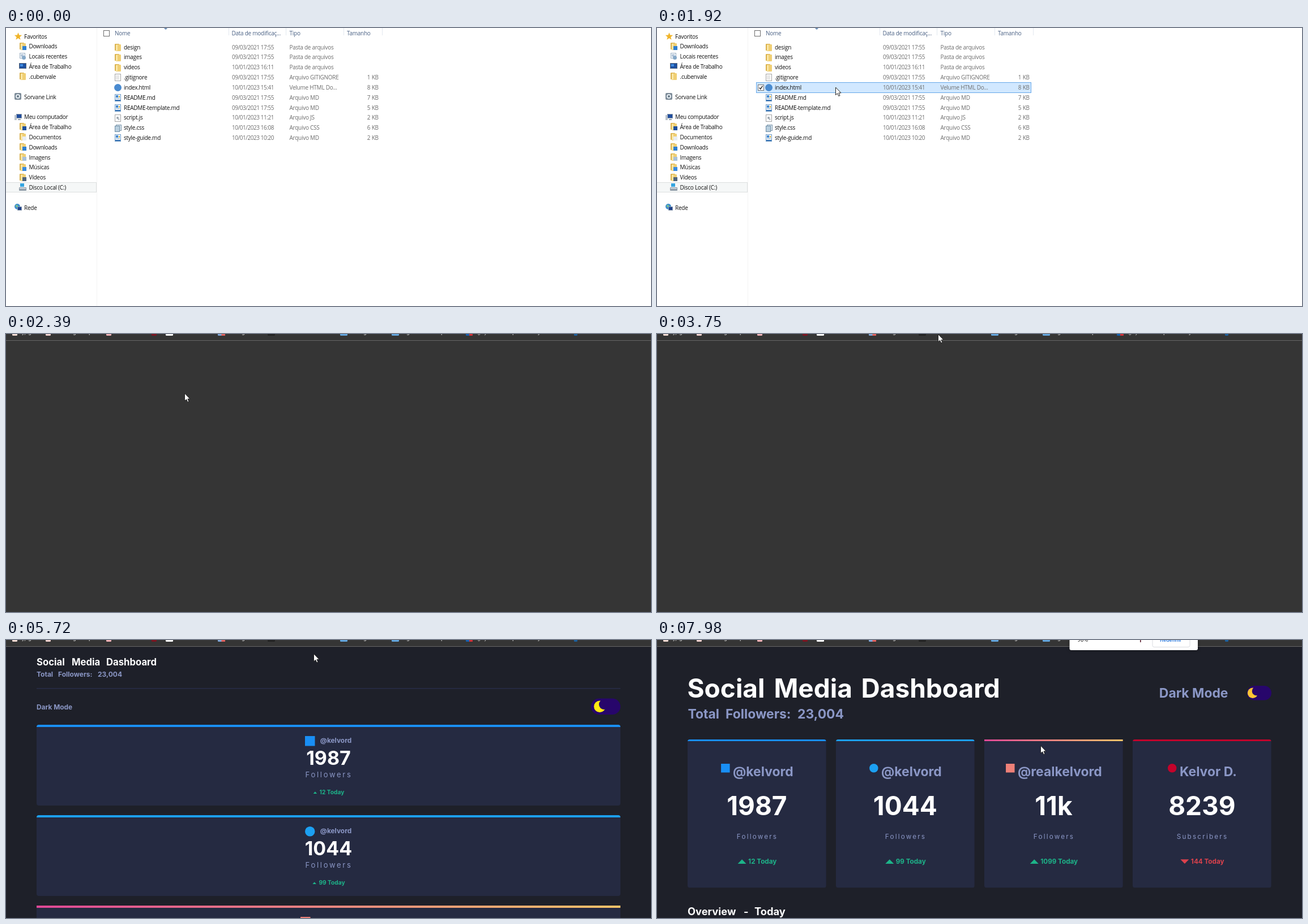
Recreate the animation shown at these times as an HTML page with a canvas. Size 1139x492 px, loop 8000 ms.

```html
<!DOCTYPE html>
<html lang="pt">
<head>
<meta charset="utf-8">
<title>Social Media Dashboard</title>
<style>
html, body { margin: 0; width: 100%; height: 100%; overflow: hidden; background: #fff; }
canvas { display: block; }
</style>
</head>
<body>
<canvas id="stage" width="1139" height="492"></canvas>
<script>
const W = 1139, H = 492, LOOP = 8000;
let c = document.getElementById('stage').getContext('2d');

const UI = '"Open Sans", "Noto Sans", sans-serif';
const ROBOTO = 'Roboto, sans-serif';
const INTER = 'Inter, sans-serif';
const SERIF = '"Liberation Serif", serif';

// ---------- helpers ----------
function rect(x, y, w, h, color) {
  c.fillStyle = color;
  c.fillRect(x, y, w, h);
}

function round(x, y, w, h, r, color) {
  c.fillStyle = color;
  c.beginPath();
  c.roundRect(x, y, w, h, r);
  c.fill();
}

function disc(x, y, r, color) {
  c.fillStyle = color;
  c.beginPath();
  c.arc(x, y, r, 0, 7);
  c.fill();
}

function frame(x, y, w, h, fill, line) {
  rect(x, y, w, h, fill);
  c.strokeStyle = line;
  c.lineWidth = 1;
  c.strokeRect(x + .5, y + .5, w - 1, h - 1);
}

function poly(points, color) {
  c.fillStyle = color;
  c.beginPath();
  points.forEach(([x, y]) => c.lineTo(x, y));
  c.fill();
}

// Returns the left edge of the drawn text.
function text(s, x, y, font, color, align = 'left', spacing = 0) {
  c.font = font;
  c.fillStyle = color;
  c.textAlign = 'left';
  c.letterSpacing = spacing + 'px';
  const w = c.measureText(s).width - spacing;
  const left = align === 'center' ? x - w / 2 : align === 'right' ? x - w : x;
  c.fillText(s, left, y);
  c.letterSpacing = '0px';
  return left;
}

function words(s, xs, y, font, color) {
  s.split(' ').forEach((word, i) => text(word, xs[i], y, font, color));
}

function seeded(seed) {
  return () => (seed = (seed * 16807) % 2147483647) / 2147483647;
}

// ---------- pointer ----------
// [first step, last step, number of steps, x, y]
const MOVES = [
  [70, 70, 1, 1054, 474], [139, 830, 11, 344, 118], [900, 900, 1, 332, 114.5],
  [970, 970, 1, 319, 107], [1170, 1170, 1, 315, 104.5],
  [2720, 2930, 4, 394, 109], [3260, 3260, 1, 395, 110],
  [3610, 3750, 3, 496, 0], [3820, 3820, 1, -50, -50],
  [5720, 5720, 1, 543, 24], [5790, 5870, 2, 612, 121],
  [6170, 6450, 5, 589, 126], [6520, 6650, 3, 594, 125.5],
  [7690, 7760, 2, 624, 103], [7830, 7980, 3, 677, 186.5]
];

function pointerAt(t) {
  let x = -50, y = -50;
  for (const [start, end, n, toX, toY] of MOVES) {
    if (t < start) break;
    const gap = n > 1 ? (end - start) / (n - 1) : 1;
    const k = Math.min(n, Math.floor((t - start) / gap + .01) + 1) / n;
    const e = k * k * (3 - 2 * k);
    x += (toX - x) * e;
    y += (toY - y) * e;
  }
  return { x, y };
}

const ARROW = new Path2D('M.5 .5V14L3.6 11.2L5.8 16L8 15L5.9 10.4H10Z');

function drawPointer({ x, y }) {
  c.save();
  c.translate(x, y);
  c.fillStyle = '#fff';
  c.strokeStyle = '#222';
  c.lineWidth = 1;
  c.fill(ARROW);
  c.stroke(ARROW);
  c.restore();
}

// ---------- file manager ----------
const ROW = 17.83;
const FILES = [
  ['design', '09/03/2021 17:55', 'Pasta de arquivos', '', 'folder'],
  ['images', '09/03/2021 17:55', 'Pasta de arquivos', '', 'folder'],
  ['videos', '10/01/2023 16:11', 'Pasta de arquivos', '', 'folder'],
  ['.gitignore', '09/03/2021 17:55', 'Arquivo GITIGNORE', '1 KB', 'page'],
  ['index.html', '10/01/2023 15:41', 'Velume HTML Do...', '8 KB', 'web'],
  ['README.md', '09/03/2021 17:55', 'Arquivo MD', '7 KB', 'md'],
  ['README-template.md', '09/03/2021 17:55', 'Arquivo MD', '5 KB', 'md'],
  ['script.js', '10/01/2023 11:21', 'Arquivo JS', '2 KB', 'script'],
  ['style.css', '10/01/2023 16:08', 'Arquivo CSS', '6 KB', 'style'],
  ['style-guide.md', '10/01/2023 10:20', 'Arquivo MD', '2 KB', 'md']
];

// [row, label, icon, badge colour]
const PLACES = [
  [0, 'Favoritos', 'star'], [1, 'Downloads', 'folder', '#2f7fd0'],
  [2, 'Locais recentes', 'recent'], [3, 'Área de Trabalho', 'screen'],
  [4, '.cubenvale', 'folder'], [6, 'Sorvane Link', 'link'],
  [8, 'Meu computador', 'computer'], [9, 'Área de Trabalho', 'folder', '#1d4f9c'],
  [10, 'Documentos', 'folder', '#e8edf2'], [11, 'Downloads', 'folder', '#2f7fd0'],
  [12, 'Imagens', 'folder', '#a8c0d8'], [13, 'Músicas', 'folder', '#3a8be0'],
  [14, 'Vídeos', 'folder', '#50657c'], [15, 'Disco Local (C:)', 'disk'],
  [17, 'Rede', 'network']
];

function page(fill = '#fdfdfd', line = '#a5a5a5') {
  frame(1, 0, 11, 13, fill, line);
}

const ICONS = {
  folder(badge) {
    round(1, 0, 8, 12, 1, '#d9b04c');
    round(3, 1, 9, 12, 1, '#f0cf74');
    rect(3, 2, 3, 10, '#f9e6a6');
    if (badge) rect(6, 6, 7, 7, badge);
  },
  page() {
    page();
    for (let y = 3; y < 11; y += 2) rect(3, y, 6, 1, '#d4d4d4');
  },
  web() { disc(6.5, 6.5, 6.5, '#4a8bd0'); },
  md() {
    page('#f4f8fc', '#6f9cc8');
    rect(3, 2, 4, 4, '#3f86cf');
    rect(8, 3, 2, 3, '#d8b34a');
    rect(3, 7, 7, 1, '#7fa9d2');
    rect(2, 10, 9, 2, '#3a74b4');
  },
  script() {
    page();
    disc(6, 6, 2, '#9aa3ac');
    disc(8, 8.5, 1.5, '#b8bec4');
  },
  style() {
    frame(3, 0, 10, 11, '#dbe6ee', '#7d98ad');
    frame(1, 2, 9, 11, '#b9cfdf', '#6f8ea6');
  },
  star() {
    const pts = [];
    for (let i = 0; i < 10; i++) {
      const r = i % 2 ? 3 : 7, a = i * Math.PI / 5;
      pts.push([6.5 + r * Math.sin(a), 7 - r * Math.cos(a)]);
    }
    poly(pts, '#f0b429');
  },
  recent() {
    frame(1, 0, 10, 10, '#eef3f8', '#9fb2c4');
    rect(3, 3, 5, 1, '#7d9cbb');
    rect(3, 5, 4, 1, '#7d9cbb');
    disc(8.5, 8.5, 3.5, '#86a9c8');
  },
  screen() {
    frame(0, 1, 13, 10, '#1c4fa0', '#5a6b80');
    rect(2, 3, 5, 4, '#3f8be0');
  },
  link() {
    round(0, 0, 12, 12, 2, '#7c8b98');
    disc(6, 6, 4, '#e6edf2');
    disc(6, 6, 2, '#657583');
  },
  computer() {
    frame(3, 1, 10, 8, '#1f4d9e', '#8a98a8');
    rect(0, 3, 4, 9, '#b9c2cb');
    rect(6, 10, 5, 2, '#9aa5b0');
  },
  disk() {
    rect(2, 0, 7, 6, '#35a5e0');
    round(0, 7, 13, 6, 1, '#8d9aa6');
    rect(1, 8, 11, 2, '#c9d2da');
  },
  network() {
    disc(5, 5, 5, '#3f8fd0');
    disc(4, 4, 2, '#7cc48a');
    frame(5, 5, 8, 7, '#1d3f88', '#8d9cb0');
  }
};

function icon(kind, x, y, badge) {
  c.save();
  c.translate(x, y);
  ICONS[kind](badge);
  c.restore();
}

function explorer(t, mouse) {
  const label = (s, x, y, color, align) => text(s, x, y, '10px ' + UI, color, align, -.26);
  rect(0, 0, W, H, '#fff');
  rect(160, 0, 1, H, '#f4f4f4');
  frame(-1, 273, 161, 18, '#f5f7f7', '#dcdfdf');

  for (const [row, name, kind, badge] of PLACES) {
    const y = 15 + row * ROW, top = [0, 6, 8, 17].includes(row);
    icon(kind, top ? 15 : 23, Math.round(y - 7), badge);
    label(name, top ? 32 : 40.5, y + 3.6, '#111');
  }

  const blue = '#4a6184';
  frame(172, 4, 11, 11, '#fff', '#6b6b6b');
  label('Nome', 192, 13, blue);
  label('Data de modificaç...', 398.5, 13, blue);
  label('Tipo', 500.5, 13, blue);
  label('Tamanho', 602, 13, blue);
  for (const x of [393, 494, 596, 664]) rect(x, 0, 1, 13, '#e2e8f0');
  poly([[279, 0], [285, 0], [283, 2.5], [281, 2.5]], '#6d8fb8');

  const selected = t >= 1640;
  let hover = -1;
  if (mouse.x >= 175 && mouse.x < 661) hover = Math.floor((mouse.y - 25) / ROW);
  FILES.forEach(([name, date, type, size, kind], i) => {
    const top = Math.round(25 + i * ROW), base = 34 + i * ROW + 3.6;
    if (i === hover) {
      frame(175, top, 486, 19, selected ? '#d1e8ff' : '#e5f3fb', selected ? '#66a7e8' : '#70c0e7');
      frame(178, top + 4, 11, 11, '#fff', '#707070');
      if (selected) {
        c.strokeStyle = '#333';
        c.lineWidth = 1.4;
        c.beginPath();
        c.moveTo(180.5, top + 9.5);
        c.lineTo(182.7, top + 12);
        c.lineTo(186.5, top + 6.5);
        c.stroke();
      }
    }
    icon(kind, 191, top + 3);
    label(name, 208, base, '#111');
    text(date, 399, base, '10px ' + UI, '#6d6d6d', 'left', -.45);
    label(type, 500.5, base, '#6d6d6d');
    label(size, 658, base, '#6d6d6d', 'right');
  });
}

// ---------- browser ----------
// [x, width, colour, second colour]
const FAVICONS = [
  [11, 9, '#f0d8d0'], [70, 9, '#f0d0cc'], [177, 9, '#f0b0b4'], [257, 9, '#7a1420'],
  [282, 13, '#fff'], [374, 13, '#7fa6d8', '#e0605c'], [462, 13, '#222'],
  [590, 13, '#62a4dc'], [681, 13, '#62a4dc'], [812, 12, '#1560b0', '#d03038'],
  [1003, 6, '#1c5f9c']
];
const TAILS = [[28, 'y,'], [39, 'g'], [118, 'g'], [146, 'p'], [416, 'g'], [631, 'g'],
  [707, 'g'], [768, 'p'], [832, '(,'], [845, ')'], [894, 'p'], [939, 'y']];

function toolbar() {
  rect(0, 0, W, 12, '#353535');
  rect(0, 11, W, 1, '#666');
  for (const [x, w, a, b] of FAVICONS) {
    round(x, -6, w, 9, 1.5, a);
    if (b) rect(x + w / 2, 0, w / 2, 3, b);
  }
  for (const [x, s] of TAILS) text(s, x, 0, '10.5px ' + ROBOTO, '#ddd');
}

// Letter strokes in a unit box
const STROKES = {
  L: 'M0 0V1H1',
  E: 'M1 0H0V1H1M0 .5H.8',
  T: 'M0 0H1M.5 0V1',
  "'": 'M1 0L0 .25',
  S: 'M1 .14C.9-.06 0-.1 0 .25C0 .55 1 .45 1 .75C1 1.1 .1 1.06 0 .86',
  G: 'M1 .15C.8-.12 0-.15 0 .5C0 1.15 1 1.15 1 .55H.6',
  H: 'M0 0V1M1 0V1M0 .5H1',
  O: 'M.5 0C-.17 0-.17 1 .5 1C1.17 1 1.17 0 .5 0Z',
  I: 'M0 0V1',
  N: 'M0 1V0L1 1V0'
};
const SLOGAN = [
  ['L', 133, 25], ['E', 179, 17], ['T', 209, 30], ["'", 260, 6], ['S', 283, 26],
  ['G', 341, 31], ['E', 392, 20], ['T', 424, 32], ['T', 506, 28], ['H', 550, 28],
  ['E', 600, 26], ['H', 668, 28], ['E', 716, 20], ['L', 752, 16], ['L', 785, 15],
  ['G', 835, 32], ['O', 885, 27], ['I', 929, 1], ['N', 947, 27], ['G', 993, 31]
];

function scribble(rnd) {
  c.lineWidth = 2;
  c.lineCap = 'round';
  for (let y = 8; y < H; y += 23) {
    for (let x = -5; x < W; x += 11 + rnd() * 10) {
      const p = () => [x + rnd() * 26 - 7, y + rnd() * 34 - 6];
      c.strokeStyle = `rgba(255,255,255,${.04 + rnd() * .04})`;
      c.beginPath();
      c.moveTo(...p());
      c.quadraticCurveTo(...p(), ...p());
      c.quadraticCurveTo(...p(), ...p());
      c.stroke();
    }
  }
  c.lineWidth = .6;
  c.strokeStyle = 'rgba(255,255,255,.16)';
  for (let i = 0; i < 70; i++) {
    const x = rnd() * W, y = 12 + rnd() * 480;
    c.beginPath();
    c.moveTo(x, y);
    c.lineTo(x + rnd() * 16 - 8, y + rnd() * 10 - 5);
    c.stroke();
  }
}

function paintWall() {
  const rnd = seeded(77), wall = document.createElement('canvas');
  wall.width = W;
  wall.height = H;
  const main = c;
  c = wall.getContext('2d');
  rect(0, 0, W, H, '#030303');
  scribble(rnd);

  const path = new Path2D();
  for (const [ch, x, w] of SLOGAN)
    path.addPath(new Path2D(STROKES[ch]), new DOMMatrix([w, 0, 0, 66, x, 242]));
  c.lineJoin = 'round';
  c.strokeStyle = '#e6e6e6';
  c.lineWidth = 13.5;
  c.stroke(path);
  c.lineCap = 'butt';
  c.lineWidth = 15.5;
  c.setLineDash([1.2, 2.1, .8, 2.7]);
  c.stroke(path);
  c = main;
  return wall;
}
const wall = paintWall();

// [label, mark colour, round mark]
const SHORTCUTS = [
  ['Página Inicia...', '#5c9fd6', true], ['CS', '#205a94'], ['Mirabanto', '#c98593'],
  ['(60) Subscri...', '#f00c0c', true], ['Fotovelia', '#e5463f', true],
  ['Drolva', '#93b1dc'], ['Home', '#262424'], ['Falvento', '#3f5a4c', true],
  ['Norda Video', '#12609f', true], ['Adicionar at...']
];

function newTab() {
  c.drawImage(wall, 0, 0);
  toolbar();
  const small = '10.6px ' + ROBOTO;
  text('Lumel', 985, 40, small, '#eee');
  text('Imagens', 1025, 40, small, '#eee');
  for (let i = 0; i < 9; i++)
    disc(1088.7 + i % 3 * 4.6, 32 + Math.floor(i / 3) * 4.6, 1.5, '#eee');
  disc(1130, 36, 12.5, '#175a8c');
  text('S', 1130, 40.5, '500 13px ' + ROBOTO, '#fff', 'center');

  disc(576, 171, 34, '#f0f0f0');
  rect(563, 261, 26, 26, '#f4f4f4');

  round(363, 236.5, 427.5, 33.5, 16.75, '#fff');
  c.strokeStyle = '#6a6a6a';
  c.lineWidth = 1.6;
  c.beginPath();
  c.arc(382.3, 251.3, 3.4, 0, 7);
  c.moveTo(385, 254);
  c.lineTo(389.5, 258.5);
  c.stroke();
  text('Pesquise no Vendra ou digite um URL', 402, 257, '11.7px ' + ROBOTO, '#5c5f63');
  round(766.4, 246, 4.4, 8.5, 2.2, '#4a90d9');
  c.strokeStyle = '#dd5548';
  c.lineWidth = 1.4;
  c.beginPath();
  c.arc(768.6, 252.3, 4.6, 0, Math.PI);
  c.moveTo(768.6, 257);
  c.lineTo(768.6, 260);
  c.stroke();

  SHORTCUTS.forEach(([label, color, circle], i) => {
    const x = 405.7 + i % 5 * 85.45, y = i < 5 ? 314.3 : 400;
    disc(x, y, 18.4, '#f3f4f5');
    if (!color) {
      rect(x - 5, y - .8, 10, 1.6, '#222');
      rect(x - .8, y - 5, 1.6, 10, '#222');
    } else if (circle) disc(x, y, 8.5, color);
    else rect(x - 9, y - 9, 18, 18, color);
    text(label, x, y + 39.5, '10.2px ' + ROBOTO, '#f2f2f2', 'center');
  });
}

function blank() {
  rect(0, 0, W, H, '#353535');
  toolbar();
}

// ---------- dashboard ----------
const BG = '#1e2029', MUTED = '#8b97c6', GREEN = '#1db489', RED = '#dc414c';
const BLUE = '#198ff5', SKY = '#1ca0f2', PINK = '#df4896', CRIMSON = '#c4032b';

// [handle, count, caption, change, colour]
const CARDS = [
  ['@kelvord', '1987', 'Followers', '12 Today', BLUE],
  ['@kelvord', '1044', 'Followers', '99 Today', SKY],
  ['@realkelvord', '11k', 'Followers', '1099 Today', PINK],
  ['Kelvor D.', '8239', 'Subscribers', '144 Today', CRIMSON]
];

function card(x, y, w, h, bar, color) {
  let fill = color;
  if (color === PINK) {
    fill = c.createLinearGradient(x, 0, x + w, 0);
    fill.addColorStop(0, PINK);
    fill.addColorStop(1, '#fdc468');
  }
  c.save();
  c.beginPath();
  c.roundRect(x, y, w, h, color === PINK ? [0, 0, 4, 4] : 4);
  c.clip();
  rect(x, y, w, h, '#252a41');
  rect(x, y, w, bar, fill);
  c.restore();
}

function toggle(x, y, w, h, moonX, r, color) {
  const my = y + h / 2;
  round(x, y, w, h, h / 2, '#27066b');
  disc(moonX, my, r, color);
  disc(moonX + r * .72, my - r * .36, r * .86, '#27066b');
}

function mark(x, y, size, color) {
  if (color === BLUE || color === PINK) rect(x, y, size, size, color === PINK ? '#ee8078' : color);
  else disc(x + size / 2, y + size / 2, size / 2, color);
}

function triangle(x, y, w, h, down) {
  const a = down ? y - h : y, b = down ? y : y - h;
  poly([[x, a], [x + w, a], [x + w / 2, b]], down ? RED : GREEN);
}

const FALLBACK = {
  font: SERIF, title: 14.3, titleX: [54, 101, 149], sub: 9.7, subX: [54, 85, 137], mode: 10.2,
  height: 138, step: 155.2, handle: 10.2, handleX: 580, markX: 534, count: 29, countY: 70,
  caption: 10.5, gap: 3, captionY: 88, change: 8.2, changeX: 574, changeY: 117, tri: 9
};
const LOADED = {
  font: INTER, title: 16.7, titleX: [54, 116, 177], sub: 12, subX: [54, 92, 162], mode: 11.9,
  height: 143, step: 160, handle: 11.9, handleX: 582.5, markX: 528, count: 34, countY: 71,
  caption: 13, gap: 2.7, captionY: 92.5, change: 10.2, changeX: 575.5, changeY: 122.5, tri: 11
};

function stacked(t) {
  const s = t < 4600 ? FALLBACK : LOADED, marks = t >= 4200;
  const bold = size => `bold ${size}px ${s.font}`;
  rect(0, 0, W, H, BG);
  toolbar();
  words('Social Media Dashboard', s.titleX, 44.8, bold(s.title), '#fff');
  words('Total Followers: 23,004', s.subX, 65.4, bold(s.sub), MUTED);
  rect(54, 85, 1031, 1.5, '#282c48');
  text('Dark Mode', 54, 122.8, bold(s.mode), MUTED);
  toggle(1033, 103.5, 52, 28.5, 1048.5, 10.3, '#ffe812');

  CARDS.slice(0, 3).forEach(([handle, count, caption, change, color], i) => {
    const y = 150 + i * s.step;
    card(54, y, 1031, s.height, 4, color);
    text(handle, s.handleX, y + 32.2, bold(s.handle), MUTED, 'center');
    if (marks) mark(i < 2 ? s.markX : s.markX - 8, y + 20, 17.5, color);
    text(count, 569.5, y + s.countY, bold(s.count), '#fff', 'center');
    text(caption, 568.7, y + s.captionY, `${s.caption}px ${s.font}`, MUTED, 'center', s.gap);
    const left = text(change, s.changeX, y + s.changeY, bold(s.change), GREEN, 'center');
    triangle(left - s.tri, y + s.changeY - .5, 6.5, 3.8);
  });
}

function zoomPopup() {
  c.save();
  c.shadowColor = 'rgba(0,0,0,.5)';
  c.shadowBlur = 5;
  round(728.5, -10, 226.5, 28, 3, '#fff');
  c.restore();
  c.strokeStyle = '#dadce0';
  c.lineWidth = 1;
  c.beginPath();
  c.roundRect(875, -12, 66, 24.5, 3);
  c.stroke();
  text('90%', 742, 3, '10.3px ' + ROBOTO, '#333');
  text('Redefinir', 888, 3, '500 9.6px ' + ROBOTO, '#2f7de0');
  rect(853, 0, 1.6, 4, '#5c2030');
}

function grid() {
  const bold = size => `bold ${size}px ${INTER}`;
  rect(0, 0, W, H, BG);
  toolbar();
  words('Social Media Dashboard', [53.5, 206.5, 360.5], 102.3, bold(46), '#fff');
  words('Total Followers: 23,004', [54.5, 121, 248], 139, bold(22.9), MUTED);
  text('Dark Mode', 1008.5, 102, bold(22.9), MUTED, 'right');
  toggle(1042, 81, 43, 25.5, 1052, 9.2, '#fdc534');

  CARDS.forEach(([handle, count, caption, change, color], i) => {
    const x = 54 + i * 262, mid = x + 122.4, down = i === 3;
    card(x, 176, 244.8, 262.5, 3, color);
    const hx = text(handle, mid + 11, 241, bold(22.9), MUTED, 'center');
    mark(hx - 21, 219, 15.5, color);
    text(count, mid, 310, bold(46), '#fff', 'center');
    text(caption, mid - .5, 351.5, `11.7px ${INTER}`, MUTED, 'center', 2.2);
    const left = text(change, mid + 9.8, 396.2, bold(11.7), down ? RED : GREEN, 'center');
    triangle(left - 18.5, 396, 15, 7.8, down);
  });
  words('Overview - Today', [54, 153, 172], 487, bold(18.3), '#fff');
  zoomPopup();
}

// ---------- loop ----------
function draw(now) {
  const t = now % LOOP, mouse = pointerAt(t);
  if (t < 2130) explorer(t, mouse);
  else if (t < 2390) newTab();
  else if (t < 4140) blank();
  else if (t < 6990) stacked(t);
  else grid();
  drawPointer(mouse);
}

let begin;
function tick(now) {
  begin ??= now;
  draw(now - begin);
  requestAnimationFrame(tick);
}
draw(0);
requestAnimationFrame(tick);
</script>
</body>
</html>
```
